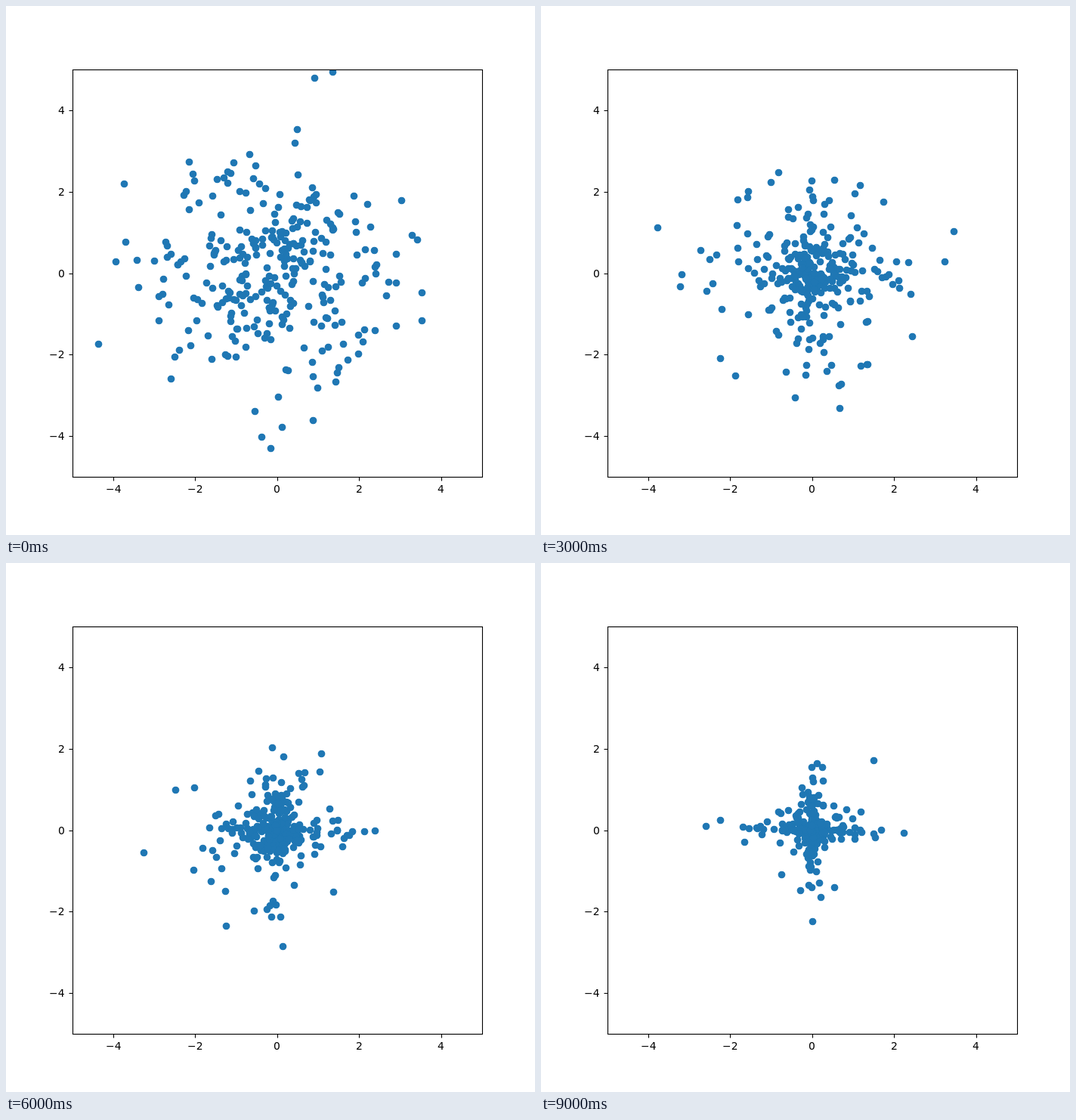
An HTML page with a canvas that plays this animation: 700 by 700 pixels, repeating every 10 s.

```html
<!DOCTYPE html>
<html lang="en">
<head>
<meta charset="utf-8">
<title>Narrowing scatter</title>
<style>
  html, body { margin: 0; width: 100%; height: 100%; overflow: hidden; background: #fff; }
  canvas { display: block; width: 700px; height: 700px; }
</style>
</head>
<body>
<canvas id="plot" width="700" height="700"></canvas>
<script>
const ctx = document.getElementById('plot').getContext('2d');
const STEP = 1000, STEPS = 10, COUNT = 300;
const RADIUS = 4.86, LINE = 1.11;
const box = { left: 88, top: 84, right: 630, bottom: 623 };

const toX = v => 358.75 + 54.25 * v;
const toY = v => 353.5 - 53.9 * v;
const snap = v => Math.floor(v) + 0.5;

function seeded(seed) {
  return () => {
    seed = (seed + 0x6D2B79F5) | 0;
    let h = Math.imul(seed ^ (seed >>> 15), 1 | seed);
    h = (h + Math.imul(h ^ (h >>> 7), 61 | h)) ^ h;
    return ((h ^ (h >>> 14)) >>> 0) / 4294967296;
  };
}

// Each step draws a fresh cloud: the core shrinks while its tails grow heavier.
function makeCloud(step) {
  const random = seeded(41 + step * 977);
  const scale = 1.25 * 0.83 ** step;
  const power = 0.87 + 0.06 * step;
  const reach = 5.4 * 0.935 ** step;
  const draw = () => {
    const side = random() < 0.5 ? -1 : 1;
    return side * scale * (-Math.log(1 - random())) ** power;
  };
  const points = [];
  while (points.length < COUNT) {
    const x = draw(), y = draw();
    const inAxes = Math.max(Math.abs(x), Math.abs(y)) < 5;
    if (inAxes && Math.hypot(x, y) < reach) points.push([snap(toX(x)), snap(toY(y))]);
  }
  return points;
}

const clouds = Array.from({ length: STEPS }, (_, step) => makeCloud(step));

function drawPoints(points) {
  ctx.save();
  ctx.beginPath();
  ctx.rect(box.left, box.top, box.right - box.left + 1, box.bottom - box.top + 1);
  ctx.clip();
  ctx.fillStyle = '#1f77b4';
  for (const [x, y] of points) {
    ctx.beginPath();
    ctx.arc(x, y, RADIUS, 0, Math.PI * 2);
    ctx.fill();
  }
  ctx.restore();
}

function drawLine(x1, y1, x2, y2) {
  ctx.beginPath();
  ctx.moveTo(x1, y1);
  ctx.lineTo(x2, y2);
  ctx.stroke();
}

function drawAxes() {
  ctx.strokeStyle = ctx.fillStyle = '#000';
  ctx.lineWidth = LINE;
  ctx.strokeRect(box.left + 0.5, box.top + 0.5, box.right - box.left, box.bottom - box.top);
  ctx.font = '13.89px "DejaVu Sans", sans-serif';
  for (let v = -4; v <= 4; v += 2) {
    const label = String(v).replace('-', '\u2212');
    const width = ctx.measureText(label).width;
    const x = Math.round(toX(v)), y = Math.round(toY(v));
    drawLine(x + 0.5, box.bottom + 0.5, x + 0.5, box.bottom + 5.5);
    drawLine(box.left + 0.5, y + 0.5, box.left - 4.5, y + 0.5);
    ctx.fillText(label, Math.round(toX(v) - width / 2), 644);
    ctx.fillText(label, Math.round(77.8 - width), y + 5);
  }
}

function render(time) {
  const step = Math.floor(Math.max(0, time) / STEP) % STEPS;
  ctx.fillStyle = '#fff';
  ctx.fillRect(0, 0, 700, 700);
  drawPoints(clouds[step]);
  drawAxes();
}

let start = null;
function tick(now) {
  if (start === null) start = now;
  render(now - start);
  requestAnimationFrame(tick);
}
render(0);
requestAnimationFrame(tick);
</script>
</body>
</html>
```
